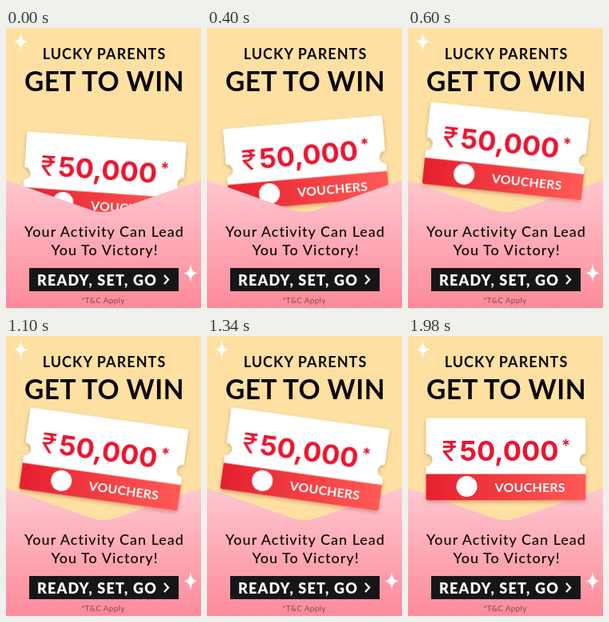
Animation of 244x350 px, one loop 2.3 s. Source, as an HTML page:

```html
<!DOCTYPE html>
<html lang="en">
<head>
<meta charset="utf-8">
<title>Lucky Parents</title>
<style>
html, body { margin: 0; width: 100%; height: 100%; overflow: hidden; }
svg { display: block; width: 100vw; height: 100vh; }
text { font-family: Lato, "Open Sans", sans-serif; }
.mid { text-anchor: middle; }
.bold { font-weight: 700; }
.copy { font-size: 18px; font-weight: 500; letter-spacing: 1px; }
.price { font-family: Inter, "Noto Sans", sans-serif; font-size: 34.5px; fill: #ea1530; }
#ticket { filter: drop-shadow(0 2px 2.5px rgba(90, 40, 20, .3)); }
</style>
</head>
<body>
<svg viewBox="0 0 244 350">
  <defs>
    <linearGradient id="pink" x2="0" y2="1">
      <stop stop-color="#fec7d0"/>
      <stop offset="1" stop-color="#fd8b9a"/>
    </linearGradient>
    <linearGradient id="red">
      <stop stop-color="#e5202f"/>
      <stop offset="1" stop-color="#ff5a55"/>
    </linearGradient>
    <path id="pocket" fill="url(#pink)" d="M0 190L108 228Q122 232 136 228L244 190V350H0Z"/>
    <path id="star" fill="#fff" d="M0-12Q.7-.7 8.5 0Q.7 .7 0 12Q-.7 .7-8.5 0Q-.7-.7 0-12Z"/>
  </defs>

  <rect width="244" height="350" fill="#fee1a2"/>
  <use href="#pocket"/>

  <!-- Ticket, centred on its own origin -->
  <g id="ticket">
    <path fill="#fff" d="M-97-51.5H97Q100-51.5 100-48.5V-7A8 8 0 0 0 100 9V48.5Q100 51.5 97 51.5H-97Q-100 51.5-100 48.5V9A8 8 0 0 0-100-7V-48.5Q-100-51.5-97-51.5Z"/>
    <path fill="url(#red)" d="M-100 18.5H100V48.5Q100 51.5 97 51.5H-97Q-100 51.5-100 48.5Z"/>
    <text class="price" x="-80" y="2">₹</text>
    <text class="price bold" x="-58" y="2">50,000</text>
    <text class="price bold" x="69.5" y="-10.5" style="font-size: 20px">*</text>
    <circle cx="-49" cy="34" r="13" fill="#fff"/>
    <text class="bold" x="-14" y="41" font-size="16" letter-spacing=".2" fill="#fff">VOUCHERS</text>
  </g>
  <use id="front" href="#pocket"/>

  <g class="mid" fill="#0b0506">
    <text class="bold" x="123" y="39" font-size="18" letter-spacing="1.05">LUCKY PARENTS</text>
    <text class="bold" x="123" y="79" font-size="33.5" letter-spacing=".5">GET TO WIN</text>
    <text class="copy" x="123" y="261">Your Activity Can Lead</text>
    <text class="copy" x="123.5" y="284">You To Victory!</text>
    <text x="121.5" y="344" font-size="10" letter-spacing=".3" fill="#84484f">*T&amp;C Apply</text>
  </g>

  <rect x="29" y="300" width="187" height="29" fill="#161618"/>
  <text x="39" y="321.5" font-size="18" font-weight="900" letter-spacing="1.2" fill="#fff">READY, SET, GO</text>
  <path d="M198 309l5 5.5l-5 5.5" fill="none" stroke="#fff" stroke-width="2.3"/>

  <g id="stars">
    <use href="#star" x="18.5" y="17"/>
    <use href="#star" x="231" y="306.5"/>
  </g>
</svg>
<script>
const LOOP = 2300;
// Each pose holds until its end time
const poses = [
  { end: 400, x: 122.5, y: 187.5, turn: 4, tucked: true, stars: true },
  { end: 600, x: 124, y: 169, turn: -5, tucked: true, stars: false },
  { end: 800, x: 122.5, y: 154, turn: 6, tucked: false, stars: true },
  { end: 1100, x: 124, y: 154, turn: -5.5, tucked: false, stars: false },
  { end: 1500, x: 122.5, y: 154, turn: 8, tucked: false, stars: true },
  { end: LOOP, x: 122.5, y: 154, turn: 0, tucked: false, stars: true }
];
const byId = id => document.getElementById(id);
const ticket = byId("ticket"), front = byId("front"), stars = byId("stars");
const show = (el, on) => el.setAttribute("visibility", on ? "visible" : "hidden");

function draw() {
  const t = performance.now() % LOOP;
  const pose = poses.find(p => t < p.end);
  ticket.setAttribute("transform", `translate(${pose.x} ${pose.y}) rotate(${pose.turn})`);
  show(front, pose.tucked);
  show(stars, pose.stars);
  requestAnimationFrame(draw);
}
draw();
</script>
</body>
</html>
```
